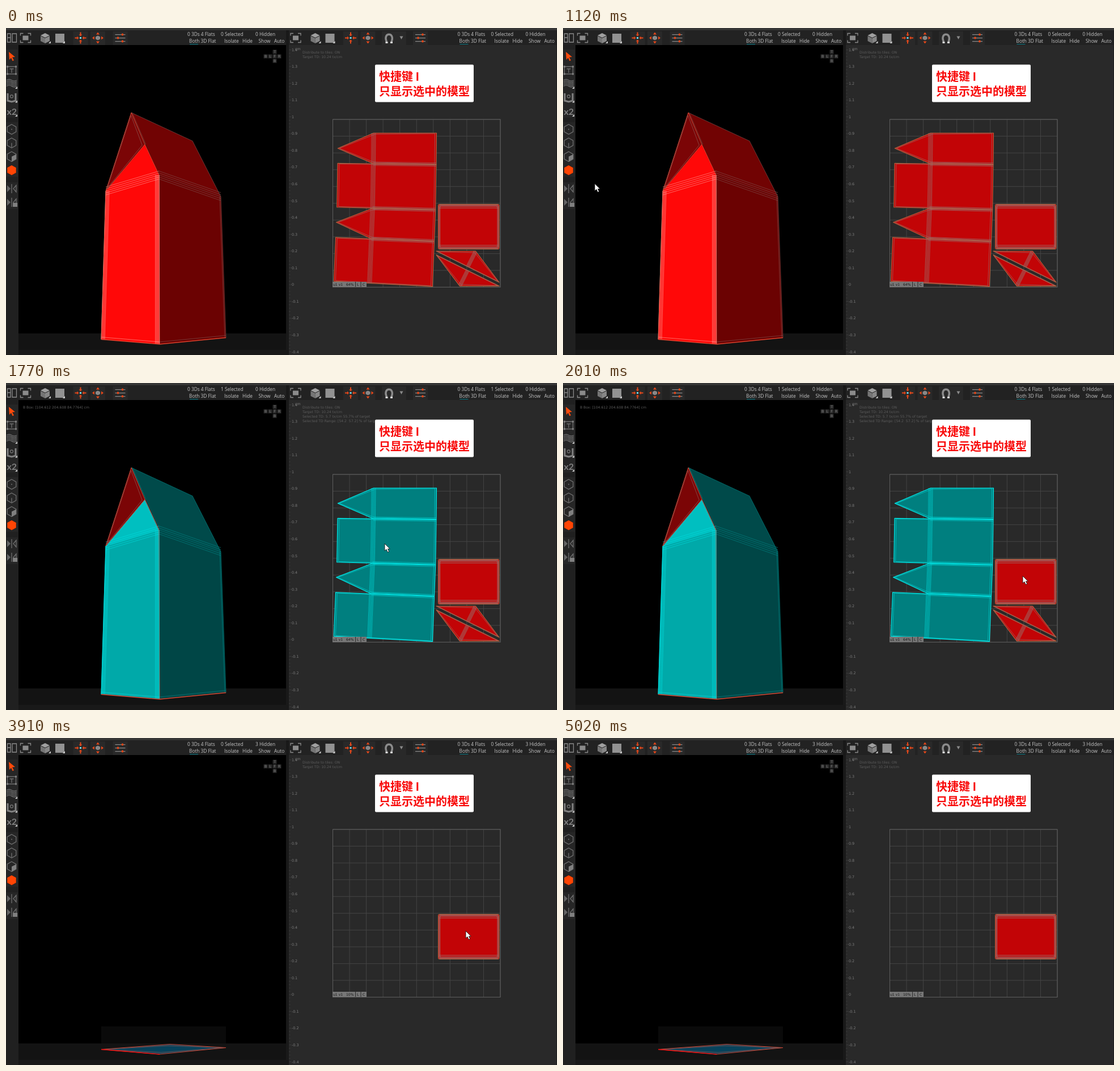
An HTML page for the animation above (5.39 s loop, 972x576 px).

```html
<!DOCTYPE html>
<html lang="zh">
<head>
<meta charset="utf-8">
<style>
html, body { margin: 0; width: 100%; height: 100%; overflow: hidden; background: #292929; }
svg { display: block; width: 972px; height: 576px; }
text { white-space: pre; }
.ui { font: 8.3px "Open Sans", "Noto Sans", sans-serif; fill: #c6c6c6; }
.tiny { font: 6.1px "DejaVu Sans", sans-serif; fill: #5c5c5c; }
.ruler { font: 6.4px "DejaVu Sans", sans-serif; fill: #7c7c7c; }
.badge { font: 6.1px "DejaVu Sans", sans-serif; fill: #181818; }
.times { font: bold 16px Lato, sans-serif; fill: #808080; }
.note { font: bold 20px "Noto Sans CJK SC", "Noto Sans CJK", sans-serif; fill: #f80808; }
.part { --fill: #c20406; --edge: #b4633f; --line: #9c6b66; }
.part.sel { --fill: #007f7f; --edge: #00f2f2; --line: #00cccc; }
.solid { --front: #ff0808; --roof: #ff0808; --side: #6b0202; --top: #710303; --wire: #ffb0a8; --dim: #7d4c4a; --rim: #f0705c; }
.solid.sel { --front: #00a9a9; --roof: #00bfc0; --side: #004646; --top: #004a4a; --wire: #00e4e4; --dim: #008080; --rim: #00eaea; }
.shape { fill: var(--fill); stroke: var(--edge); stroke-width: 1.1; stroke-linejoin: round; }
.line { fill: none; stroke: var(--line); stroke-width: .7; }
.wire { fill: none; stroke: var(--wire); stroke-width: .55; }
.dim { fill: none; stroke: var(--dim); stroke-width: .7; }
.rim { fill: none; stroke: var(--rim); stroke-width: 1; }
.seam { fill: none; stroke: #cf4432; stroke-width: 1; }
.inner { fill: none; stroke: #8f5a55; stroke-width: .7; }
.icon { fill: none; stroke: #8b8b8b; stroke-width: 1.3; }
.tools .icon { stroke: #707070; }
</style>
</head>
<body>
<svg id="stage" viewBox="0 0 972 576"></svg>
<script>
const LOOP = 5390;
const STEP = 40;

const range = (n, fn) => Array.from({ length: n }, (_, i) => fn(i)).join('');
const mix = (a, b, k) => a + (b - a) * k;
const add = ([x, y], dx, dy) => [x + dx, y + dy];
const rect = (x, y, w, h, fill, more = '') =>
  `<rect x="${x}" y="${y}" width="${w}" height="${h}" fill="${fill}" ${more}/>`;
const path = (d, more) => `<path d="${d}" ${more}/>`;
const fillPath = (d, fill) => path(d, `fill="${fill}"`);
const cls = (d, name) => path(d, `class="${name}"`);
const text = (x, y, name, value, more = '') => `<text x="${x}" y="${y}" class="${name}" ${more}>${value}</text>`;
const move = (x, y, body) => `<g transform="translate(${x} ${y})">${body}</g>`;
const group = (id, name, body) => `<g id="${id}" class="${name}">${body}</g>`;
const trace = points => 'M' + points.map(p => p.map(v => v.toFixed(1)).join(' ')).join('L');
const face = (fill, ...points) => fillPath(trace(points) + 'z', fill);

// Parallel lines along a-b, spread by ±(dx, dy)
const fold = (a, b, dx, dy, n, name) => cls(range(n, i => {
  const k = n > 1 ? mix(-1, 1, i / (n - 1)) : 0;
  return trace([a, b].map(p => add(p, dx * k, dy * k)));
}), name);

// Moves every corner a distance towards the middle
function inset(points, distance) {
  const mid = [0, 1].map(j => points.reduce((sum, p) => sum + p[j], 0) / points.length);
  return points.map(p => {
    const k = distance / Math.hypot(mid[0] - p[0], mid[1] - p[1]);
    return p.map((v, j) => mix(v, mid[j], k));
  });
}
const piece = points => cls(trace(points) + 'z', 'shape') + cls(trace(inset(points, 3.2)) + 'z', 'line');

// Toolbars
const cell = x => rect(x - 13, 6, 26, 24, '#292929');
const corner = (x, y) => fillPath(`M${x} ${y}v-4l-4 4z`, '#ccc');
const frameIcon = () => cls('M-9-4V-8H-4M4-8H9V-4M9 4V8H4M-4 8H-9V4', 'icon') + rect(-5, -4, 10, 8, '#8b8b8b');
const cubeIcon = () => fillPath('M0-9L8-5 0-1-8-5z', '#a0a0a0') +
  fillPath('M-8-4L0 0V9L-8 5z', '#757575') + fillPath('M8-4L0 0V9L8 5z', '#878787') + corner(10, 9);
const squareIcon = () => rect(-8, -8, 16, 16, '#929292') + corner(9, 9);
const arrows = (arm, core) => range(4, i => path(arm, `fill="#e8481a" transform="rotate(${i * 90})"`)) + core;
const sliders = () => range(3, i => rect(-9, i * 6 - 6.5, 18, 1.2, '#8b8b8b') +
  `<circle cx="${i % 2 ? -4 : 4}" cy="${i * 6 - 6}" r="1.9" fill="#e8481a"/>`);

const counters = (x, side) =>
  text(x, 13.8, 'ui', '0 3Ds 4 Flats') +
  text(x + 59, 13.8, 'ui', '', `id="selected${side}"`) + text(x + 120, 13.8, 'ui', '', `id="hidden${side}"`) +
  text(x + 3, 26, 'ui', 'Both 3D Flat') + text(x + 65, 26, 'ui', 'Isolate   Hide') +
  text(x + 125.5, 26, 'ui', 'Show   Auto') + rect(x + 4, 28, 15, 1, '#087b88');

const toolbar = (x, slidersX, side) =>
  cell(x + 97) + cell(x + 127.5) + cell(slidersX) +
  move(x, 17.5, frameIcon()) + move(x + 34.5, 18, cubeIcon()) + move(x + 60.5, 18, squareIcon()) +
  move(x + 97, 17.5, arrows('M0-3L3-6H1V-10H-1V-6H-3z', rect(-1.5, -1.5, 3, 3, '#6fd8e8'))) +
  move(x + 127.5, 17.5, arrows('M0-10L3-6H-3z', fillPath('M0-4L4-2V2L0 4-4 2V-2z', '#888'))) +
  move(slidersX, 17.5, sliders()) + counters(x + 285.5, side);

const magnet = () => rect(663, 6, 43, 24, '#292929') +
  path('M671.5 24C664 7 687 7 680 24', 'fill="none" stroke="#8b8b8b" stroke-width="3.5"') +
  rect(669.5, 24, 4, 3, '#ddd') + rect(678, 24, 4, 3, '#ddd') + fillPath('M694.5 14.5h6l-3 5.5z', '#8b8b8b');

// Tool column
const HEX = 'M0-8.7L7.8-4.4V4.4L0 8.7-7.8 4.4V-4.4z';
const hexMarks = [cls('M-1 0h2', 'icon'), cls('M0 0V8', 'icon'), fillPath('M0 0L8-4V4L0 9z', '#808080'), fillPath(HEX, '#ff4505')];
const mirrorIcon = () => fillPath('M-8-6L-2 0-8 6z', '#666') + cls('M0-8V8M8-6L3 0 8 6z', 'icon');
const sideTools = () => group('tools', 'tools',
  rect(0, 38, 21, 120, '#262626') + rect(0, 166, 21, 96, '#262626') + rect(0, 272, 21, 47, '#262626') +
  fillPath('M5 42L16 51 11 51.5 14 57 11.5 58 9 52.5 6 56z', '#ff4a0a') +
  cls('M2.5 68H17.5V81H2.5zM6.5 72H13.5M10 72V79', 'icon') +
  range(4, i => rect(1 + (i % 2) * 15, 66.5 + (i >> 1) * 13, 3, 3, '#808080')) +
  range(5, i => cls(`M1 ${92 + i * 2.6}q4.5-3 9 0t9 0`, 'icon')) +
  path('M3 115V128L10 130 17 128V115', 'fill="none" stroke="#808080" stroke-width="3"') +
  '<circle cx="10" cy="120.5" r="2.5" class="icon"/>' + text(1.5, 152.5, 'times', 'x2') +
  range(3, i => corner(20, 107 + i * 24.5)) +
  hexMarks.map((mark, i) => move(10, 178.5 + i * 24, cls(HEX, i < 3 ? 'icon' : '') + mark)).join('') +
  move(10, 283, mirrorIcon()) + move(10, 307, mirrorIcon()) + rect(12, 308, 8, 7, '#808080'));

const navKey = (letter, column, row) => move(454.5 + column * 8, 38.5 + row * 8,
  rect(0, 0, 7, 7, '#2b2b2b') + text(3.5, 5.8, 'tiny', letter, 'text-anchor="middle" style="fill:#808080"'));
const navCross = () => navKey('T', 2, 0) + [...'BLFR'].map((c, i) => navKey(c, i, 1)).join('') + navKey('B', 2, 2);

// Carton: key corners, everything else follows from them
const peak = [221, 149], ridge = [329, 199], shoulder = [379, 297], notch = [245, 205];
const eave = [176, 287], post = [270, 259], footLeft = [168, 548.5], foot = [271, 557], footRight = [388, 545.5];
const footBack = [289, 539.5];

const carton = () => group('solid', 'solid',
  face('var(--side)', post, shoulder, footRight, foot) +
  face('var(--top)', peak, ridge, shoulder, post) +
  face('var(--front)', eave, notch, post, foot, footLeft) +
  face('var(--roof)', eave, notch, post) +
  face('#7b0506', peak, eave, notch) +
  fold(eave, post, 0, 7, 5, 'wire') + fold(post, shoulder, 0, 7, 5, 'dim') +
  fold(add(eave, 3, 0), add(footLeft, 3, 0), 3, 0, 4, 'wire') +
  cls(trace([notch, post, foot]), 'seam') +
  fold(add(post, -3, 0), add(foot, -4, 0), 3.5, 0, 5, 'wire') +
  fold(add(footLeft, 0, -4), add(foot, 0, -4), 0, 0, 1, 'wire') +
  fold(add(foot, 0, -4), add(footRight, 0, -4), 0, 0, 1, 'dim') +
  cls(trace([peak, ridge, shoulder, footRight]), 'dim') +
  cls(trace([add(shoulder, -2, 0), add(footRight, -2, 0)]), 'dim') +
  cls(trace([footLeft, eave]), 'rim') +
  cls(trace([peak, eave, notch]) + 'z', 'seam') + cls(trace(inset([peak, eave, notch], 5)) + 'z', 'inner') +
  fold(add(peak, 1.5, 0), add(notch, 1.5, 0), 0, 0, 1, 'dim') +
  path(trace([footLeft, foot, footRight]), 'id="baseEdge" fill="none" stroke-width="1.3"'));

const floorPiece = () => {
  const outline = [footLeft, footBack, footRight, foot];
  return group('floor', '', rect(168, 508, 220, 30, '#0a0a0a') + face('#07425b', ...outline) +
    cls(trace(outline) + 'z', 'seam') + cls(trace(inset(outline, 4)) + 'z', 'inner') +
    path(trace([footLeft, foot]), 'stroke="#f01212" stroke-width="1.4"'));
};

// Unfolded strips: row edges alternate narrow and wide and fan out downwards
const netPoint = (row, x) => {
  const px = x - 0.45 * row * row;
  return [px, 185 + 54 * Math.ceil(row / 2) + 78.4 * Math.floor(row / 2) + row * (px - 648) / 75];
};
const LEFT = 585.5, FOLD = 648.5, RIGHT = 759.5;
const strip = row => {
  const top = netPoint(row, FOLD), bottom = netPoint(row + 1, FOLD);
  const end = [netPoint(row + 1, RIGHT), netPoint(row, RIGHT)];
  const tip = [mix(top[0], bottom[0], .5) - 63, mix(top[1], bottom[1], .5) - row];
  const start = row % 2 ? [netPoint(row, LEFT), netPoint(row + 1, LEFT)] : [tip];
  const outline = row % 2 ? [...start, ...end] : [...start, bottom, ...end, top];
  return piece(outline) + fold(top, bottom, 3.5, 0, 5, 'line');
};
const mainFlat = () => group('main', 'part', range(4, strip) +
  range(3, i => fold(netPoint(i + 1, FOLD), netPoint(i + 1, RIGHT), 0, 3, 4, 'line')));

const baseFlat = () => group('base', 'part',
  range(3, i => rect(762.5 + i * 1.5, 310.5 + i * 1.5, 107.5 - i * 3, 79 - i * 3, i ? 'none' : 'var(--fill)',
    `rx="2" stroke="var(--${i ? 'line' : 'edge'})"`)) +
  range(2, i => fold([764, 314.5 + i * 71], [868, 314.5 + i * 71], 0, 3, 4, 'line')));

const flap = () => piece([[759, 393], [828.5, 393], [870, 448]]) + fold([828, 394], [815, 420], 2.5, 1.5, 6, 'line');
const flapFlats = () => group('flaps', 'part', flap() + `<g transform="rotate(180 814.5 423.8)">${flap()}</g>`);

const CELL = 29.55;
const grid = () =>
  range(11, i => path(`M576.5 ${161 + i * CELL}h295.5M${576.5 + i * CELL} 161v295.5`, 'stroke="#444"')) +
  rect(576.5, 161, 295.5, 295.5, 'none', 'stroke="#5e5e5e"') +
  range(19, i => text(504, 40.6 + i * CELL, 'ruler', String((14 - i) / 10))) +
  range(92, i => rect(499.5, 38 + i * CELL / 5, i % 5 ? 2 : 4, 0.7, '#464646')) + text(510, 38.5, 'ruler', 'cm');

const badge = () => rect(576, 447, 60, 9, '#777') + rect(616, 447, 1, 9, '#292929') + rect(625.5, 447, 1, 9, '#292929') +
  text(577, 454, 'badge', '', 'id="zoom"') + text(619, 454, 'badge', 'L') + text(629, 454, 'badge', 'C');

const info = ['Distribute to tiles: ON', 'Target TD: 10.24 tx/cm', '', ''];
const stage = document.getElementById('stage');
stage.innerHTML =
  rect(0, 0, 972, 576, '#292929') + rect(22, 30, 472, 508, '#000') +
  rect(22, 538, 472, 29, '#131313') + rect(22, 567, 472, 9, '#191919') +
  rect(0, 0, 972, 4, '#363636') + rect(0, 4, 972, 26, '#222') +
  rect(0, 30, 22, 546, '#202020') + rect(494, 4, 5, 572, '#191919') + rect(971, 4, 1, 572, '#1c1c1c') +
  cls('M2.5 10H8V25H2.5zM11 10H18.5V25H11zM2 17H8', 'icon') +
  toolbar(34.5, 201.5, 'L') + toolbar(511, 731, 'R') + magnet() + sideTools() + navCross() +
  text(30, 44.5, 'tiny', '', 'id="bounds"') + floorPiece() + carton() + grid() +
  mainFlat() + flapFlats() + baseFlat() + badge() +
  info.map((line, i) => text(523, 44.5 + i * 8, 'tiny', line, `id="info${i}"`)).join('') +
  rect(651, 64.5, 174, 66, '#fff', 'rx="2"') +
  text(658, 93, 'note', '快捷键 I') + text(658, 119, 'note', '只显示选中的模型') +
  '<path id="cursor" d="M0 0V12.5L3 10 5.3 15 7.7 14 5.5 9.2H9.3z" fill="#fff" stroke="#111" stroke-width=".8"/>';

const get = id => document.getElementById(id);
const show = (id, on) => get(id).setAttribute('visibility', on ? 'visible' : 'hidden');
const setText = (id, value) => { get(id).textContent = value; };

const ENTRY = [549, 541];
const moves = [
  { start: 200, end: 680, to: [5, 242], sag: 0 },
  { start: 720, end: 880, to: [7, 246], sag: 0 },
  { start: 1040, end: 1520, to: [668, 283], sag: 93 },
  { start: 1770, end: 2010, to: [811, 340], sag: 0 },
  { start: 4620, end: 5020, to: [757, 553], sag: 0 }
];
function cursorAt(t) {
  let spot = ENTRY;
  for (const { start, end, to, sag } of moves) {
    if (t < start) break;
    const raw = Math.min(1, Math.floor((t - start) / STEP) * STEP / (end - start));
    const k = raw * raw * (3 - 2 * raw);
    spot = [mix(spot[0], to[0], k), mix(spot[1], to[1], k) + sag * 4 * k * (1 - k)];
  }
  return spot;
}

function render(t) {
  const mainOn = t >= 1770 && t < 2460;
  const baseOn = t >= 2460 && t < 3910;
  const isolated = t >= 3910;
  const picked = mainOn || baseOn;
  get('solid').classList.toggle('sel', mainOn);
  get('main').classList.toggle('sel', mainOn);
  get('base').classList.toggle('sel', baseOn);
  get('baseEdge').setAttribute('stroke', baseOn ? '#00a9b0' : '#d9402c');
  ['solid', 'main', 'flaps'].forEach(id => show(id, !isolated));
  show('floor', isolated);
  for (const side of 'LR') {
    setText('selected' + side, `${+picked} Selected`);
    setText('hidden' + side, `${isolated ? 3 : 0} Hidden`);
  }
  setText('zoom', `u1 v1   ${isolated ? 10 : 64}%`);
  setText('bounds', picked ? `B Box: [104.612 ${mainOn ? '204.608' : '1.086'} 84.7764] cm` : '');
  setText('info2', picked ? `Selected TD: ${mainOn ? '5.7 tx/cm 55.7%' : '7.86 tx/cm 76.8%'} of target` : '');
  setText('info3', picked ? `Selected TD Range: [${mainOn ? '54.2  57.2' : '72.6  78.3'}] % of target` : '');

  show('cursor', t >= 200 && t < 5020);
  const [x, y] = cursorAt(t);
  get('cursor').setAttribute('transform', `translate(${x.toFixed(1)} ${y.toFixed(1)})`);
}

const origin = performance.now();
function tick() {
  render((performance.now() - origin) % LOOP);
  requestAnimationFrame(tick);
}
tick();
</script>
</body>
</html>
```
